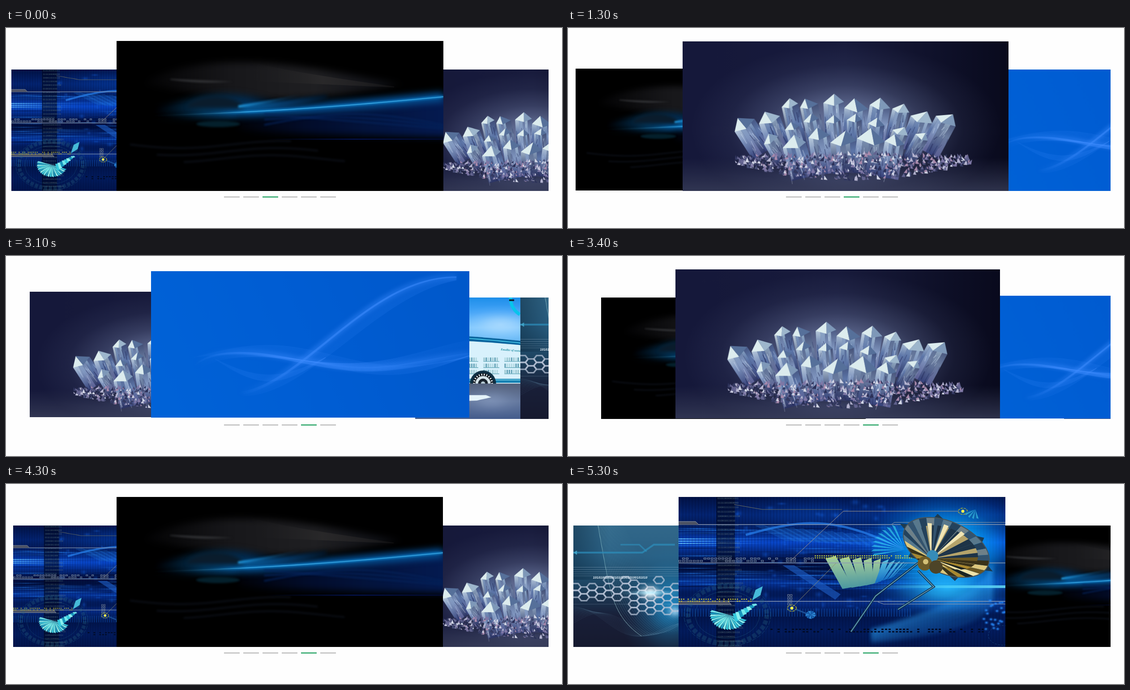
Write an HTML page with a canvas that moves like this. It is 1242 px wide and 448 px high and loops after 7300 ms.

```html
<!DOCTYPE html>
<html lang="en">
<head>
<meta charset="utf-8">
<title>Carousel</title>
<style>
html, body { margin: 0; width: 100%; height: 100%; overflow: hidden; background: #fefefe; }
canvas { display: block; }
</style>
</head>
<body>
<canvas id="stage" width="1242" height="448"></canvas>
<script>
const W = 730, H = 336, TAU = Math.PI * 2;
const { sin, cos, exp, abs, floor, hypot, atan2 } = Math;
const lerp = (a, b, t) => a + (b - a) * t;
const arch = u => sin(Math.PI * u);

let seed = 7;
function rnd(a = 0, b = 1) {
  seed = (seed * 16807) % 2147483647;
  return a + (b - a) * seed / 2147483647;
}
const pick = list => list[floor(rnd(0, list.length))];

function repeat(n, fn) {
  for (let i = 0; i < n; i++) fn(i, n > 1 ? i / (n - 1) : 0);
}

function slide(paint) {
  const c = document.createElement('canvas');
  c.width = W;
  c.height = H;
  paint(c.getContext('2d'));
  return c;
}

// Evenly spaced colours from one point to another
function grad(g, x0, y0, x1, y1, ...colors) {
  const f = g.createLinearGradient(x0, y0, x1, y1);
  colors.forEach((c, i) => f.addColorStop(i / (colors.length - 1), c));
  return f;
}
const down = (g, y0, y1, ...colors) => grad(g, 0, y0, 0, y1, ...colors);
const across = (g, x0, x1, ...colors) => grad(g, x0, 0, x1, 0, ...colors);

function rect(g, x, y, w, h, fill) {
  g.fillStyle = fill;
  g.fillRect(x, y, w, h);
}

function glow(g, x, y, rx, ry, rgb, alpha) {
  g.save();
  g.translate(x, y);
  g.scale(rx, ry);
  const f = g.createRadialGradient(0, 0, 0, 0, 0, 1);
  [1, 0.75, 0.35, 0.1, 0].forEach((k, i) => f.addColorStop(i / 4, `rgba(${rgb},${alpha * k})`));
  rect(g, -1, -1, 2, 2, f);
  g.restore();
}

function poly(g, points, fill) {
  g.beginPath();
  points.forEach(p => g.lineTo(...p));
  g.fillStyle = fill;
  g.fill();
}

function line(g, points, color, w = 1) {
  g.beginPath();
  points.forEach(p => g.lineTo(...p));
  g.strokeStyle = color;
  g.lineWidth = w;
  g.stroke();
}

const sample = (f, n = 48) => Array.from({ length: n + 1 }, (_, i) => f(i / n));
const plot = (g, f, color, w) => line(g, sample(f), color, w);

// Area between two heights given as functions of 0..1
function band(g, x0, x1, top, bottom, fill) {
  const edge = f => sample(u => [lerp(x0, x1, u), f(u)]);
  poly(g, [...edge(top), ...edge(bottom).reverse()], fill);
}

function ring(g, x, y, rx, ry, color, w = 1, dash = []) {
  g.setLineDash(dash);
  g.beginPath();
  g.ellipse(x, y, rx, ry, 0, 0, TAU);
  g.strokeStyle = color;
  g.lineWidth = w;
  g.stroke();
  g.setLineDash([]);
}

function disc(g, x, y, r, color) {
  g.beginPath();
  g.arc(x, y, r, 0, TAU);
  g.fillStyle = color;
  g.fill();
}

function blurred(g, px, draw) {
  g.save();
  g.filter = `blur(${px}px)`;
  draw();
  g.restore();
}

const hexMesh = slide(g => {
  rect(g, 0, 0, W, H, down(g, 0, H, '#32688a', '#2a6084', '#1d4360', '#191f38', '#161a2f'));
  rect(g, 0, 0, 100, 150, across(g, 0, 100, 'rgba(10,36,56,.45)', 'rgba(10,36,56,0)'));
  glow(g, 270, 220, 150, 170, '30,140,200', 0.9);
  glow(g, 280, 238, 32, 26, '190,230,255', 0.7);
  const face = k => u => [68 + 55 * u + 65 * u ** 6 + k * (3 + 4 * u), 306 * u - k * u];
  repeat(24, k => plot(g, face(k), `rgba(150,215,225,${0.3 - k * 0.011})`, 0.8));
  repeat(12, k => plot(g, u => [290 * u, 270 - 28 * sin(u * 6 + k * 0.12) + k * 4 * (u - 0.4)], 'rgba(120,170,195,.14)'));
  plot(g, face(0), 'rgba(175,225,225,.55)', 1.2);
  line(g, [[0, 75], [190, 75], [222, 53], [280, 53]], 'rgba(45,145,190,.7)', 5);
  line(g, [[130, 53], [182, 53], [202, 72]], 'rgba(45,145,190,.6)', 4);
  poly(g, [[0, 75], [10, 69], [10, 81]], '#3da0c4');
  repeat(5, i => rect(g, 0, 115 + i * 6, W, 1, 'rgba(180,205,225,.35)'));
  rect(g, 0, 217, W, 1, 'rgba(180,205,225,.3)');
  repeat(14, col => repeat(5, row => {
    const x = 6 + col * 23, y = 151 + row * 19 + (col % 2) * 9.5;
    if (row === 0 && rnd() < 0.6 || row > 2 && col < 7 || rnd() < 0.1) return;
    line(g, sample(u => [x + 15 * cos(u * TAU), y + 11 * sin(u * TAU)], 6), 'rgba(188,198,218,.72)', 4);
  }));
  g.font = 'italic bold 9px "Liberation Sans", sans-serif';
  g.fillStyle = '#e6f2fa';
  g.fillText('101010010100101010010100101010', 54, 147);
  glow(g, 212, 186, 42, 30, '255,255,255', 1);
  glow(g, 212, 186, 90, 10, '170,235,255', 0.7);
});

function fan(g, x, y, r, n, from, to, colors) {
  const tip = (a, k) => [x + r * k * cos(a), y + r * k * 0.8 * sin(a)];
  repeat(n, i => {
    const a = lerp(from, to, i / n), b = lerp(from, to, (i + 0.85) / n);
    poly(g, [[x, y], tip(a, 1), tip(b, 0.92)], colors[i % colors.length]);
  });
}

function node(g, x, y) {
  ring(g, x, y, 10, 7, '#b8b52e', 1.5, [5, 2]);
  disc(g, x, y, 3.5, '#f4ee50');
}

// Rows of small cells, some left out
function cells(g, x0, x1, y, step, w, h, color, keep, hollow) {
  for (let x = x0; x < x1; x += step)
    repeat(2, row => {
      if (rnd() > keep) return;
      const top = y + row * (h + 2.5);
      if (hollow) {
        g.strokeStyle = color;
        g.lineWidth = 1;
        g.strokeRect(x + 0.5, top + 0.5, w, h);
      } else rect(g, x, top, w, h, color);
    });
}

function dish(g) {
  const hub = [565, 138], turn = 0.42;
  const rim = (a, k) => {
    const x = 102 * k * cos(a), y = 58 * k * sin(a);
    return [598 + x * cos(turn) - y * sin(turn), 113 + x * sin(turn) + y * cos(turn)];
  };
  const steel = ['#33536e', '#58788c', '#24425c', '#6e8088'];
  const gold = ['#dcc67c', '#3a3218', '#a8872e', '#1d2420', '#f0e2a8', '#6b5722'];
  repeat(6, i => {
    const a = i / 6 * TAU + 0.1;
    poly(g, [rim(a, 1.15), rim(a + 0.16, 0.95), rim(a - 0.16, 0.95)], '#1d3b50');
  });
  repeat(30, i => {
    const a = i / 30 * TAU, b = a + TAU / 30, low = a < 2.6 || a > 6;
    poly(g, [hub, rim(a, 1), rim(b, 1)], low ? gold[i * 5 % 6] : steel[i % 4]);
    poly(g, [hub, rim(a, 0.74), rim(b, 0.74)], low ? gold[i % 6] : i % 3 ? '#1d3347' : '#b5a36a');
  });
  repeat(3, i => poly(g, [hub, rim(3.9 + i * 0.5, 0.82), rim(4.03 + i * 0.5, 0.8)], '#f1e5b4'));
  plot(g, u => rim(u * TAU, 1), '#46555c', 2);
  disc(g, 567, 132, 13, '#368cb8');
  disc(g, 550, 149, 16, '#6c5b28');
  disc(g, 575, 157, 15, '#4d4428');
  disc(g, 552, 145, 6, '#d5c177');
}

const tech = slide(g => {
  rect(g, 0, 0, W, H, '#011040');
  // Soft blue bands: centre, half height, strength
  for (const [y, h, k] of [[40, 45, 0.35], [102, 42, 1], [192, 30, 0.65], [238, 26, 0.5], [300, 60, 0.2]])
    rect(g, 0, y - h, W, 2 * h, down(g, y - h, y + h, 'rgba(8,70,200,0)', `rgba(8,70,200,${k})`, 'rgba(8,70,200,0)'));
  glow(g, 300, 40, 250, 60, '5,60,160', 0.6);
  repeat(110, () => {
    const x = rnd(-150, 500), y = rnd(62, 212), w = rnd(80, 300);
    const c = pick(['40,140,255', '0,10,50']);
    rect(g, x, y, w, rnd(1, 3), across(g, x, x + w, `rgba(${c},0)`, `rgba(${c},.45)`, `rgba(${c},0)`));
  });
  repeat(3, i => rect(g, 0, 93 + i * 5, 200, 2, across(g, 0, 200, '#64c4ff', 'rgba(40,130,255,0)')));
  repeat(60, () => glow(g, rnd(130, 480), rnd(8, 260), rnd(6, 18), rnd(4, 12), '20,95,220', 0.4));
  for (let x = 2; x < W; x += 7) rect(g, x, 0, 1, H, 'rgba(0,6,35,.28)');
  for (let x = 0; x < 520; x += 6) rect(g, x, 250, 3, 18, 'rgba(12,64,150,.55)');

  glow(g, 600, 120, 250, 190, '0,110,255', 0.95);
  glow(g, 595, 115, 175, 125, '10,215,255', 1);
  glow(g, 600, 205, 160, 70, '40,190,255', 0.85);
  blurred(g, 5, () => repeat(7, i =>
    plot(g, u => [700 - 270 * u, 150 + i * 12 + 150 * u ** 0.5 - i * 8 * u], `rgba(50,170,255,${0.34 - i * 0.03})`, 10)));
  rect(g, 400, 198, 330, 6, across(g, 400, W, 'rgba(90,220,255,0)', 'rgba(110,235,255,.8)'));

  plot(g, u => [150 + 350 * u, 85 + 30 * u - 40 * arch(u)], 'rgba(40,130,240,.7)', 5);
  repeat(13, i => poly(g, [[170 + i * 22, 64 + i * 2], [190 + i * 22, 62 + i * 2], [265 + i * 18, 98 + i], [240 + i * 18, 99 + i]], 'rgba(40,140,245,.2)'));
  poly(g, [[232, 153], [258, 153], [362, 218], [350, 230]], 'rgba(30,95,200,.6)');
  repeat(11, (i, u) => {
    const x = 328 + 33 * i - 1.5 * i * i, w = 23 - 18 * u, lean = Math.max(38 - 11 * i, -30);
    const top = 132 + 15 * u, end = 206 - 26 * u;
    poly(g, [[x, top + 6], [x + w, top], [x + w + lean, end - 4], [x + lean, end]],
      down(g, top, end, i < 5 ? '#a9cf9a' : '#5cc4e0', i < 5 ? '#4b97a0' : '#126cc4'));
  });
  fan(g, 505, 118, 75, 18, 2.9, 4.5, ['rgba(50,200,240,.7)', 'rgba(10,90,200,.6)']);

  rect(g, 84, 0, 42, H, 'rgba(0,8,32,.6)');
  g.font = '6px "Liberation Mono", monospace';
  g.fillStyle = 'rgba(125,150,150,.65)';
  for (let y = 5; y < H; y += 10)
    g.fillText(Array.from({ length: floor(rnd(9, 17)) }, () => pick('01')).join(''), 87, y);

  line(g, [[124, 17], [187, 28], [365, 28]], '#6f7060');
  line(g, [[250, 143], [368, 32], [625, 32]], '#a8998a');
  line(g, [[253, 248], [352, 148]], '#918f70');
  for (const y of [61, 147, 233]) rect(g, 0, y, W, 1.5, '#8b9ab4');
  const tab = (x, y, w, h) => {
    poly(g, [[x, y], [x + w, y], [x + w + h, y + h], [x, y + h]], '#4c5264');
    line(g, [[x, y], [x + w, y], [x + w + h, y + h]], '#9198a4');
  };
  tab(0, 55, 38, 7);
  tab(0, 241, 118, -7);
  line(g, [[475, 62], [482, 57], [W, 57]], '#9198a4');
  line(g, [[445, 235], [458, 240], [W, 240]], '#9a9eaa');
  cells(g, 0, 310, 136, 8, 5, 3, '#8190a8', 0.7, true);
  cells(g, 243, 255, 218, 6, 4, 4, '#758092', 1, true);
  cells(g, 243, 255, 231, 6, 4, 4, '#758092', 1, true);
  cells(g, 304, 692, 131, 5, 3, 2, '#d0d840', 0.85);
  cells(g, 0, 162, 228, 5, 3, 2, '#d8cc38', 0.65);
  cells(g, 205, 690, 295, 8, 5, 3, '#010a24', 0.7);

  ring(g, 109, 264, 97, 70, 'rgba(40,110,140,.5)', 1, [10, 3]);
  ring(g, 109, 264, 88, 64, 'rgba(40,100,130,.3)', 10, [9, 4]);
  ring(g, 109, 264, 72, 53, 'rgba(40,110,140,.4)', 1);
  const shell = ['#35c8dc', '#8cf0f0', '#1797bd', '#74e6ea'];
  fan(g, 112, 264, 43, 20, 0.35, 3.5, shell);
  glow(g, 102, 276, 30, 20, '140,255,245', 0.6);
  repeat(8, i => {
    const x = 126 + i * 6, y = 268 - i * 4;
    poly(g, [[x - 5, y - 7 + i], [x + 5, y - 8 + i], [x + 8, y + 9 - i], [x, y + 12 - i]], shell[i % 4]);
  });
  poly(g, [[172, 208], [188, 200], [183, 220], [164, 232]], '#46bad8');
  node(g, 253, 249);
  line(g, [[263, 252], [290, 263]], '#1b4d94', 3);
  fan(g, 295, 264, 12, 9, 0, TAU, ['#2c86d4', '#1763b4']);
  node(g, 635, 32);
  fan(g, 663, 28, 27, 8, 1.3, 2.9, ['#2ba0d0', '#0c60a8']);

  for (const [color, w] of [['#122a45', 5], ['#5d9db8', 2]]) {
    line(g, [[535, 148], [440, 222], [385, 302]], color, w);
    line(g, [[535, 165], [570, 201], [490, 252]], color, w);
  }
  dish(g);
  repeat(24, () => glow(g, rnd(682, W), rnd(232, 300), 6, 5, '40,140,255', 0.9));
  ring(g, 724, 310, 32, 22, 'rgba(40,95,145,.6)', 1, [4, 3]);
});

const dark = slide(g => {
  rect(g, 0, 0, W, H, '#000');
  const ridge = u => 98 - 50 * arch(u ** 0.7);
  blurred(g, 8, () => {
    band(g, 60, 640, ridge, u => 96 + 34 * arch(u), across(g, 60, 640, '#020203', '#17171a', '#1f1f22', '#0a0c12'));
    band(g, 90, 400, u => 152 - 32 * arch(u), u => 158 + 12 * arch(u), across(g, 90, 400, '#01060e', '#04304f', '#052c50', '#01101f'));
    band(g, 270, 800, u => 158 - 40 * u, u => 190 + 26 * u ** 0.3, across(g, 270, W, '#010208', '#020c2a', '#03143e', '#041a50'));
  });
  band(g, 300, 620, u => 46 + 56 * u ** 0.8, u => 90 + 14 * u, across(g, 300, 620, 'rgba(30,30,32,0)', 'rgba(44,43,44,.8)', 'rgba(40,38,38,.3)'));
  blurred(g, 2, () => band(g, 120, 260, u => 85 + 6 * u, u => 87 + 4 * u + 4 * arch(u), '#333437'));

  const beam = u => [70 + 660 * u, 168 - 43 * u + 6 * arch(u)];
  const wing = u => [272 + 140 * u, 147 - 20 * u - 7 * u * u];
  const lit = c => across(g, 70, W, 'rgba(0,0,0,0)', c, c, c);
  blurred(g, 8, () => plot(g, beam, lit('rgba(5,95,170,.85)'), 20));
  blurred(g, 4, () => {
    band(g, 270, 470, u => 148 - 28 * u, u => 151 - 20 * u ** 3, across(g, 270, 470, '#0a70b8', '#063c6c', '#021426'));
    band(g, 158, 282, u => 148 - 24 * arch(u) ** 0.5, () => 150, '#0a1c2c');
  });
  blurred(g, 2, () => {
    plot(g, beam, lit('#1590dc'), 4);
    plot(g, wing, across(g, 272, 412, '#22a2ec', 'rgba(5,60,110,0)'), 5);
    g.beginPath();
    g.ellipse(227, 186, 49, 7, 0, 0, TAU);
    g.fillStyle = '#04202c';
    g.fill();
    repeat(3, i => plot(g, u => [330 + 400 * u, 188 - 12 * i - (24 - 12 * i) * arch(u) + 16 * i * u], '#05235a', 3));
    repeat(3, i => plot(g, u => [30 + 60 * i + 360 * u, 232 + 16 * i + 8 * sin(u * 5 + i)], '#0a0d14', 4));
  });
  plot(g, beam, lit('rgba(80,190,245,.8)'), 1.3);
  rect(g, 330, 219, 400, 2, across(g, 330, W, '#000', '#04155a', '#020b35'));
});

function prism(g, bx, by, tx, ty, w) {
  const len = hypot(tx - bx, ty - by), r = w / 2, cap = w * 0.42;
  const tones = ['#dcebee', '#8fa9c6', '#54668f', '#a9c3d4', '#353f68'];
  g.save();
  g.translate(bx, by);
  g.rotate(atan2(tx - bx, by - ty));
  let x = -r;
  tones.forEach((tone, i) => {
    const end = i === 4 ? r : x + w * rnd(0.13, 0.26);
    poly(g, [[x, 0], [x, cap - len], [end, cap - len], [end, 0]],
      down(g, -len, 0, tone, pick(['#5d76a8', '#8096bf', '#6a7c9f']), pick(['#36427a', '#5b5f94', '#2c3464'])));
    x = end;
  });
  const knee = [rnd(-0.3, 0.3) * r, cap * 1.4 - len], top = [rnd(-0.3, 0.3) * r, -len];
  poly(g, [[-r, cap - len], top, knee], '#dcecee');
  poly(g, [top, [r, cap - len], knee], pick(['#7e98b8', '#9db6cc', '#56709a']));
  repeat(floor(w / 3), () => {
    const a = rnd(-r, r), y = rnd(cap * 1.5 - len, -12);
    line(g, [[a, y], [a + rnd(-4, 4), y + rnd(8, 26)]], pick(['rgba(225,238,255,.4)', 'rgba(25,32,80,.5)']), rnd(0.7, 2));
  });
  g.restore();
}

const crystal = slide(g => {
  rect(g, 0, 0, W, H, across(g, 0, W, '#15183a', '#181b3c', '#090a1d'));
  rect(g, 0, 262, W, 74, down(g, 262, H, 'rgba(55,61,88,0)', 'rgba(58,63,90,.75)'));
  glow(g, 365, 195, 350, 190, '118,132,172', 0.95);
  glow(g, 365, 280, 340, 34, '14,17,40', 0.8);
  // Rows from back to front: count, half width, tip height, drop at the sides, base, thickness
  const rows = [[10, 232, 116, 48, 240, 46], [8, 175, 158, 40, 258, 36], [5, 120, 188, 18, 296, 56]];
  for (const [n, half, top, drop, base, w] of rows)
    repeat(n, (i, t) => {
      const u = t * 2 - 1;
      prism(g, 365 + u * half * 0.8, base + 12 * u * u, 362 + u * half + rnd(-6, 6), top + drop * u * u + rnd(-4, 14), w * rnd(0.8, 1.2));
    });
  const tones = ['#b5b4d0', '#7f78a6', '#a98aac', '#474e78', '#d4d8e8', '#62638f', '#343a62', '#2b3058'];
  repeat(620, () => {
    const u = rnd(-1, 1), x = 380 + u * 262, y = rnd(250 + abs(u) * 8, 312 - u * u * 38);
    const s = rnd(3, 8);
    poly(g, [[x - s * 0.6, y + s * 0.4], [x + s * rnd(-0.9, 0.9), y - s], [x + s * 0.6, y + s * 0.5]], pick(tones));
  });
});

const wave = slide(g => {
  rect(g, 0, 0, W, H, grad(g, 0, H, W, 0, '#0063d8', '#005dd3', '#0058ca'));
  const rise = x => 277 - 265 * (1 - cos(Math.PI * ((x - 200) / 500) ** 0.85)) / 2;
  const flow = x => 203 - 18 * cos((x - 190) * TAU / 600) + 23 * exp((98 - x) / 30);
  const curl = x => 198 + 40 * arch((x - 140) / 260);
  const hill = x => 194 - 24 * sin((x - 110) * TAU / 620);
  const ribbon = (f, x0, x1, gap, n, alpha, w = 1) => repeat(n, (i, k) => {
    const c = a => `rgba(62,140,255,${a})`;
    plot(g, u => [lerp(x0, x1, u), f(lerp(x0, x1, u)) + k * gap(u)], across(g, x0, x1, c(0), c(alpha), c(alpha), c(alpha * 0.5)), w);
  });
  blurred(g, 5, () => {
    ribbon(rise, 200, 700, () => 0, 1, 0.4, 14);
    ribbon(flow, 98, W, () => 0, 1, 0.4, 14);
  });
  ribbon(rise, 200, 700, u => 8 + 30 * arch(u), 16, 0.3);
  ribbon(rise, 200, 700, u => 6 - 4 * u, 5, 0.35, 1.5);
  ribbon(flow, 98, W, u => 20 - 50 * u, 14, 0.24);
  ribbon(flow, 98, W, u => 3 + 8 * u, 6, 0.3, 2);
  ribbon(hill, 90, W, u => 26 * arch(u), 12, 0.25);
  ribbon(curl, 140, 400, u => 14 * arch(u), 9, 0.25);
});

const van = slide(g => {
  rect(g, 0, 0, W, H, down(g, 0, 125, '#1e8fea', '#46a5f8', '#80c8ff', '#64b6f4'));
  glow(g, 235, 75, 130, 55, '185,225,255', 0.7);
  const hoop = (x, y, r, from, to) =>
    plot(g, u => [x + r * cos(lerp(from, to, u)), y + r * sin(lerp(from, to, u))], '#08c4ec', 9);
  hoop(315, 2, 52, 2.1, 3.2);
  hoop(365, 30, 30, 1.2, 4.8);
  hoop(365, 30, 48, 1.7, 2.7);
  rect(g, 259, 5, 14, 5, '#10283c');
  const roof = u => 100 + 10 * u + 17 * u * u;
  band(g, 0, 350, roof, () => 238, '#d8f1fc');
  band(g, 0, 350, roof, u => roof(u) + 15 - 4 * u, '#08649e');
  plot(g, u => [350 * u, roof(u) + 6], '#54d6f4', 2);
  rect(g, 331, 136, 3, 90, '#167aaa');
  repeat(9, i => {
    const x = 130 + (i % 3) * 58, y = 176 + floor(i / 3) * 17;
    rect(g, x, y, 44, 2, '#79b6c6');
    repeat(7, k => rect(g, x + k * 6, y - 10, 4, 10, pick(['#b5dbe4', '#9ec9d3', '#6aa6ba'])));
  });
  g.save();
  g.translate(236, 146);
  g.rotate(0.08);
  g.font = 'italic bold 8px "Liberation Serif", serif';
  g.fillStyle = '#178aa0';
  g.fillText('Emoller of wonderfuje motifs', 0, 0);
  g.restore();
  rect(g, 350, 127, W - 350, 111, '#69b9e6');
  const screen = [[410, 142], [350, 130], [334, 178], [350, 224], [410, 226]];
  poly(g, screen, '#c3ecfc');
  line(g, screen, '#14659a', 4);
  rect(g, 0, 225, 350, 11, '#1681b2');
  rect(g, 0, 227, 350, 2, '#86dcf0');
  ['#103044', '#0c1118', '#d7e5ea', '#18222c', '#b7cbd4'].forEach((c, i) => disc(g, 187, 238, 36 - 7.5 * i, c));
  ring(g, 187, 238, 25, 25, '#edf6fa', 5, [3, 4]);
  rect(g, 0, 238, W, 98, down(g, 238, H, '#54617c', '#65799f', '#445c8c'));
  glow(g, 210, 285, 100, 50, '150,170,205', 0.45);
  poly(g, [[120, 270], [195, 270], [210, 276], [170, 285], [120, 287]], '#e4f3fa');
});

const slides = [hexMesh, tech, dark, crystal, wave, van];
const COUNT = slides.length, LOOP = 7300, STEP = 100, MOVE = 480;
// Start time and direction of each slide change
const moves = [[900, 1], [1760, 1], [3040, -1], [3854, -1], [4804, -1]];

// Same curve as the CSS keyword "ease"
function ease(x) {
  if (x >= 1) return 1;
  const bez = (a, b, t) => 3 * a * t * (1 - t) ** 2 + 3 * b * t * t * (1 - t) + t ** 3;
  let lo = 0, hi = 1;
  repeat(24, () => {
    const mid = (lo + hi) / 2;
    if (bez(0.25, 0.25, mid) < x) lo = mid; else hi = mid;
  });
  return bez(0.1, 1, lo);
}

// Slots: -1 left, 0 centre, 1 right, 2 and up wait behind the right one
const slot = (i, mid) => (i - mid + 1 + COUNT) % COUNT - 1;
const slotX = s => s < 0 ? 12 : s === 0 ? 247 : 882 + 235 * (s - 1);

function place(i, mid, dir, q) {
  const a = slot(i, mid), b = slot(i, mid + dir);
  const near = lerp(a === 0 ? 1 : 0, b === 0 ? 1 : 0, q);
  const k = 4 * near * (1 - near), left = a + b < 0;
  const wraps = abs(a - b) > 1;
  const w = lerp(591, 730, near), h = lerp(272, 336, near);
  return {
    img: slides[i], w, h,
    x: lerp(slotX(a), slotX(b), q) + k * (left ? 18 : -20),
    y: 365 - h - k * (left ? 9 : 7),
    z: near > 0 ? 10 + near : b === 1 ? 6 : wraps ? 5 : b
  };
}

const g = document.getElementById('stage').getContext('2d');

function draw(t) {
  let mid = 2, dot = 2, dir = 0, q = 0;
  for (const [at, d] of moves) {
    if (t <= at) break;
    if (d > 0) dot++;
    const p = ease((t - at) / MOVE);
    if (p < 1) { dir = d; q = p; } else mid += d;
  }
  rect(g, 0, 0, 1242, 448, '#fefefe');
  g.save();
  g.beginPath();
  g.rect(12, 0, 1200, 448);
  g.clip();
  slides.map((_, i) => place(i, mid, dir, q))
    .sort((a, b) => a.z - b.z)
    .forEach(s => g.drawImage(s.img, s.x, s.y, s.w, s.h));
  g.restore();
  repeat(COUNT, i => rect(g, 487 + 43 * i, 377, 35, 3, i === dot ? '#4ab37e' : '#c8c8c8'));
}

const start = performance.now();
function tick() {
  const t = (performance.now() - start) % LOOP;
  draw(floor(t / STEP) * STEP);
  requestAnimationFrame(tick);
}
tick();
</script>
</body>
</html>
```
